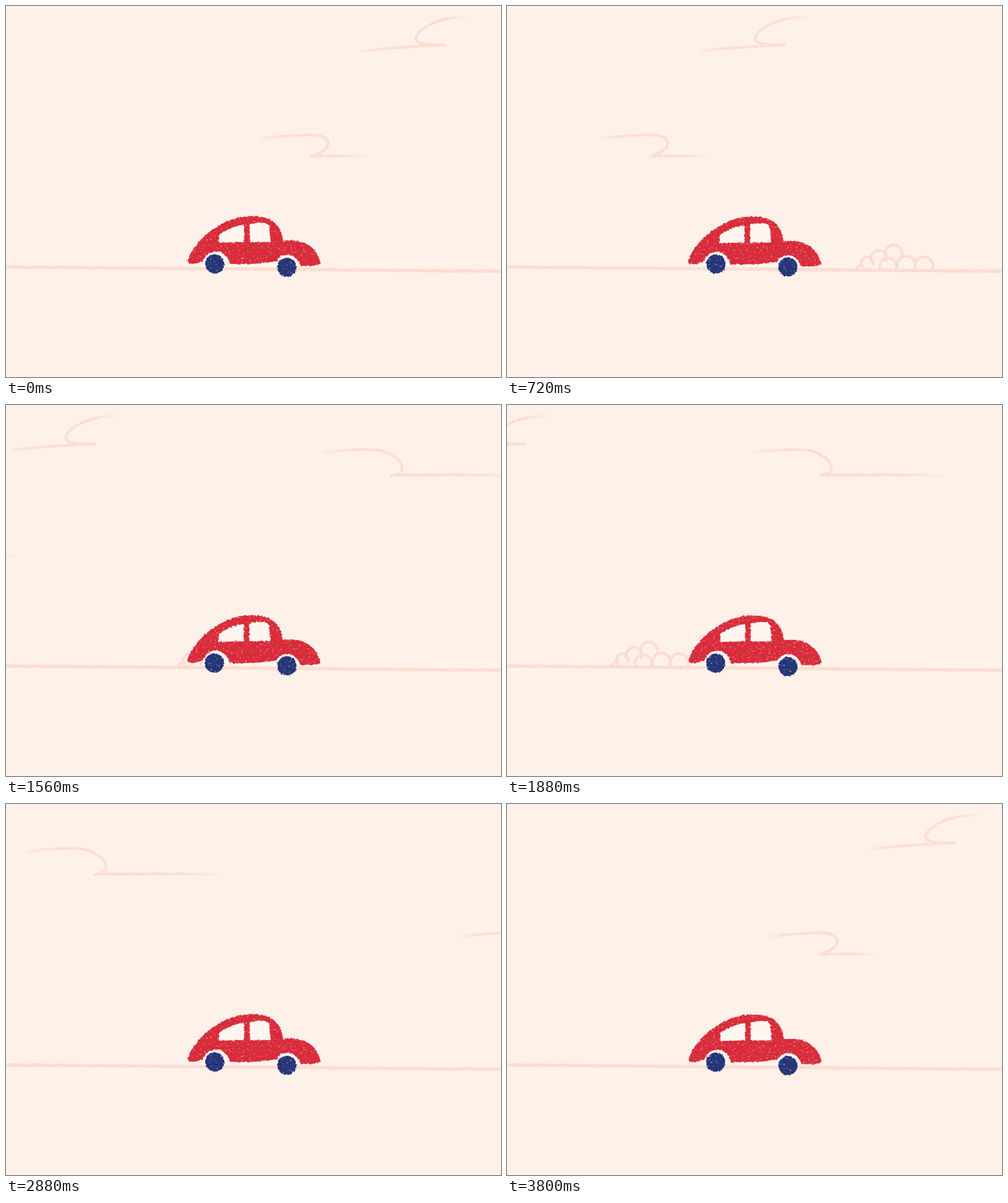
An HTML page that plays this animation: 800x600 px, repeating every 3840 ms.

```html
<!DOCTYPE html>
<html lang="en">
<head>
<meta charset="utf-8">
<title>Red car</title>
<style>
html, body { margin: 0; width: 100%; height: 100%; overflow: hidden; background: #fef1e9; }
svg { display: block; width: 800px; height: 600px; }
.line { fill: none; stroke-linecap: round; stroke-linejoin: round; }
</style>
</head>
<body>
<svg viewBox="0 0 800 600">
  <defs>
    <linearGradient id="fade">
      <stop offset="0" stop-color="#fcdccf" stop-opacity=".3"/>
      <stop offset=".15" stop-color="#fcdccf"/>
      <stop offset=".8" stop-color="#fcdccf"/>
      <stop offset="1" stop-color="#fcdccf" stop-opacity=".2"/>
    </linearGradient>
    <filter id="chalk" x="-10%" y="-100%" width="120%" height="300%" color-interpolation-filters="sRGB">
      <feTurbulence type="fractalNoise" baseFrequency=".4" numOctaves="2" seed="4" result="noise"/>
      <feDisplacementMap in="SourceGraphic" in2="noise" scale="2.5" xChannelSelector="R" yChannelSelector="G" result="rough"/>
      <feColorMatrix in="noise" values="0 0 0 0 0  0 0 0 0 0  0 0 0 0 0  0 0 0 3 -.5"/>
      <feComposite in="rough" operator="in"/>
      <feGaussianBlur stdDeviation=".4"/>
    </filter>
    <filter id="crayon" filterUnits="userSpaceOnUse" x="280" y="330" width="240" height="115" color-interpolation-filters="sRGB">
      <feTurbulence id="grain" type="fractalNoise" baseFrequency=".3" numOctaves="2" result="noise"/>
      <feDisplacementMap in="SourceGraphic" in2="noise" scale="4" xChannelSelector="R" yChannelSelector="G" result="rough"/>
      <feColorMatrix in="noise" values="0 0 0 0 0  0 0 0 0 0  0 0 0 0 0  0 0 0 2 .2"/>
      <feComposite in="rough" operator="in"/>
      <feGaussianBlur stdDeviation=".7"/>
    </filter>
  </defs>

  <g class="line" stroke="url(#fade)" stroke-width="4.5">
    <g id="hookCloud"><path filter="url(#chalk)" d="M575 73Q630 66 709 63Q662 64 662 53C666 34 705 17 745 18"/></g>
    <g id="lowCloud"><path filter="url(#chalk)" d="M413 214Q470 208 497 208.5C524 209 535 230 493 243Q545 241 580 244"/></g>
    <g id="longCloud"><path filter="url(#chalk)" d="M267 77Q315 70 356 73C388 78 412 110 376 114Q515 111 574 115"/></g>
  </g>
  <g class="line" stroke="#fbdacf">
    <g id="bush"><path id="bumps" filter="url(#chalk)" stroke-width="4.5"/></g>
    <path filter="url(#chalk)" stroke-width="5.5" d="M-5 422L805 429"/>
  </g>

  <path fill="#fff8f3" opacity=".7" d="M316 402H476V422H316Z"/>
  <g filter="url(#crayon)">
    <g id="body">
      <path fill="#d82b3a" d="M293 412C298 394 318 371 336 360Q365 340 397 340C429 340 444 354 447 380C475 377 499 384 508 416Q505 422 475 420C468 398 443 398 437 413Q400 419 361 417C354 390 325 392 318 413Q292 422 293 412Z"/>
      <path fill="#fff6f0" d="M343 383L344 370Q362 357 384 354V382ZM393 353Q424 346 425 359L427 382H393Z"/>
    </g>
    <g fill="#243477">
      <circle class="wheel" r="15.5"/>
      <circle class="wheel" r="15.5"/>
    </g>
  </g>
</svg>
<script>
const LOOP = 3840, STEP = 40, HOLD = 160, POSES = 6;
const CLOUD_SPEED = 0.3625, BUSH_SPEED = 0.341, SLOPE = 7 / 800;
const byId = id => document.getElementById(id);
const wheels = document.querySelectorAll('.wheel');

const move = (el, x, y = 0) => el.setAttribute('transform', `translate(${x} ${y})`);

// Each bump is a little over half a circle: centre x, y and radius
const bump = ([x, y, r]) =>
  `M${x - r} ${y + r * .3}a${r * 1.044} ${r * 1.044} 0 1 1 ${r * 2} 0`;
byId('bumps').setAttribute('d', [
  [571, 425, 5], [582, 415, 9], [601, 408, 12], [625, 400, 13],
  [616, 421, 13], [645, 419, 14], [674, 420, 14]
].map(bump).join(''));

// Seeded value between -1 and 1
function jitter(seed) {
  const x = Math.sin(seed * 12.9898) * 43758.5453;
  return 2 * (x - Math.floor(x)) - 1;
}

function setPose(pose) {
  const wobble = n => 0.8 * jitter(pose * 7 + n);
  move(byId('body'), wobble(1), wobble(2) / 2);
  move(wheels[0], 337.3 + wobble(3), 417.4 + wobble(4) / 2);
  move(wheels[1], 454 + wobble(5), 422.5 + wobble(6));
  byId('grain').setAttribute('seed', 11 + pose);
}

let lastTime, lastPose;
function draw(now) {
  const t = Math.floor(now % LOOP / STEP) * STEP;
  if (t !== lastTime) {
    lastTime = t;
    const wrapped = t > 2400 ? t - LOOP : t;
    move(byId('hookCloud'), -CLOUD_SPEED * wrapped);
    move(byId('lowCloud'), -(wrapped < 0 ? 0.335 : CLOUD_SPEED) * wrapped);
    move(byId('longCloud'), -CLOUD_SPEED * (t - 2240));
    const bushX = -BUSH_SPEED * (t - 720);
    move(byId('bush'), bushX, bushX * SLOPE);
    const pose = Math.floor(t / HOLD) % POSES;
    if (pose !== lastPose) setPose(lastPose = pose);
  }
  requestAnimationFrame(() => draw(performance.now()));
}
draw(performance.now());
</script>
</body>
</html>
```
